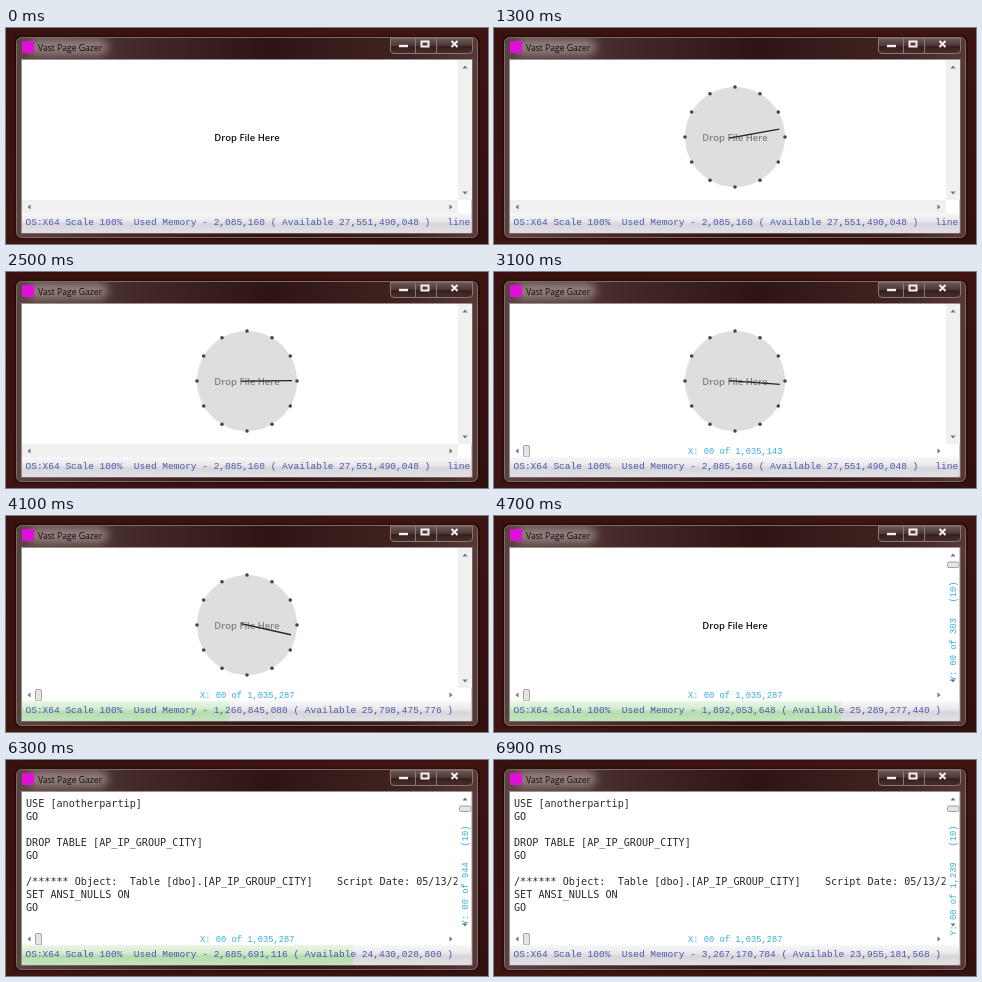
Animation, 482 px wide and 216 px high, one loop 8 s. Source, as an HTML page:

```html
<!DOCTYPE html>
<html lang="en">
<head>
<meta charset="utf-8">
<title>Vast Page Gazer</title>
<style>
  html, body { margin: 0; width: 100%; height: 100%; overflow: hidden; background: #35120f; }
  svg { display: block; width: 100vw; height: 100vh; }
  text { white-space: pre; }
  .ui { font-family: "Open Sans", "Noto Sans", sans-serif; }
  .status { font: 9.5px "Liberation Mono", monospace; fill: #4c55a8; }
  .axis { font: 8.75px "Liberation Mono", monospace; fill: #35aede; }
  .code { font: 10.15px "DejaVu Sans Mono", monospace; fill: #2a2a2a; }
</style>
</head>
<body>
<svg viewBox="0 0 482 216" preserveAspectRatio="none">
  <defs>
    <linearGradient id="desk" x2="1" y2="1">
      <stop offset="0" stop-color="#37120f"/>
      <stop offset=".5" stop-color="#3f1512"/>
      <stop offset="1" stop-color="#32110e"/>
    </linearGradient>
    <linearGradient id="glass">
      <stop offset="0" stop-color="#5a4442"/>
      <stop offset=".3" stop-color="#402625"/>
      <stop offset=".55" stop-color="#2e1514"/>
      <stop offset=".85" stop-color="#402422"/>
      <stop offset="1" stop-color="#573a37"/>
    </linearGradient>
    <linearGradient id="bar" x2="0" y2="1">
      <stop offset="0" stop-color="#f8f8f9"/>
      <stop offset=".4" stop-color="#e9e9ed"/>
      <stop offset=".55" stop-color="#d6d6db"/>
      <stop offset="1" stop-color="#e2e2e6"/>
    </linearGradient>
    <linearGradient id="green" x2="0" y2="1">
      <stop offset="0" stop-color="#e9f7e6"/>
      <stop offset=".4" stop-color="#d2ecce"/>
      <stop offset=".55" stop-color="#b4dcae"/>
      <stop offset="1" stop-color="#c4e5be"/>
    </linearGradient>
    <linearGradient id="button" x2="0" y2="1">
      <stop offset="0" stop-color="#705a58"/>
      <stop offset=".5" stop-color="#4d3634"/>
      <stop offset=".5" stop-color="#341d1c"/>
      <stop offset="1" stop-color="#482f2d"/>
    </linearGradient>
    <filter id="soft" x="-30%" y="-80%" width="160%" height="260%"><feGaussianBlur stdDeviation="5"/></filter>
    <clipPath id="view"><rect x="16" y="32" width="435.5" height="140"/></clipPath>
    <clipPath id="foot"><rect x="16" y="185" width="449" height="20"/></clipPath>
    <clipPath id="head"><rect x="11" y="10" width="460" height="21"/></clipPath>
  </defs>

  <rect width="482" height="216" fill="url(#desk)"/>
  <rect x="8" y="7.5" width="466" height="204" rx="6" fill="#1d0908" opacity=".5"/>
  <rect x="10.5" y="9.5" width="461" height="200" rx="5" fill="url(#glass)" stroke="#7d6967"/>
  <g clip-path="url(#head)">
    <rect x="22" y="11" width="80" height="16" rx="8" fill="#93817f" filter="url(#soft)"/>
  </g>
  <rect x="16" y="13" width="12" height="12" fill="#e010d8"/>
  <text class="ui" x="32" y="22.5" font-size="8.6" fill="#120808">Vast Page Gazer</text>

  <path d="M384.5 10V22Q384.5 25.5 388 25.5H463Q466.5 25.5 466.5 22V10Z" fill="url(#button)" stroke="#8b7775"/>
  <path d="M409.5 10V25M430.5 10V25" stroke="#8b7775"/>
  <g fill="none" stroke="#f4f0f0">
    <path d="M393 18H402" stroke-width="2.4"/>
    <rect x="415.5" y="13.5" width="7" height="5" stroke-width="2"/>
    <path d="M445.5 13L451.5 19M451.5 13L445.5 19" stroke-width="2"/>
  </g>

  <rect x="15.5" y="31.5" width="450.5" height="173.5" fill="#fff" stroke="#a0908f"/>
  <rect id="trackX" x="16" y="172" width="436" height="13" fill="#f0f0f0"/>
  <rect id="trackY" x="452" y="32" width="14" height="140" fill="#f0f0f0"/>
  <g fill="#70747a">
    <path d="M456.5 40.5L459 37.5L461.5 40.5Z"/>
    <path d="M456.5 163.5L459 166.5L461.5 163.5Z"/>
    <path d="M24.5 176.5L21.5 179L24.5 181.5Z"/>
    <path d="M443.5 176.5L446.5 179L443.5 181.5Z"/>
  </g>
  <g id="axisX">
    <rect x="29.5" y="173.5" width="6" height="11.5" rx="1.5" fill="#e4e4e6" stroke="#a0a2a6"/>
    <text id="labelX" class="axis" x="194" y="182"></text>
  </g>
  <g id="axisY">
    <rect x="453.5" y="46" width="11.5" height="5.5" rx="1.5" fill="#e4e4e6" stroke="#a0a2a6"/>
    <text id="labelY" class="axis" transform="translate(462 65.5) rotate(-90)" text-anchor="end"></text>
  </g>

  <text id="drop" class="ui" x="241" y="113" text-anchor="middle" font-size="9.5" font-weight="600" fill="#111">Drop File Here</text>
  <g id="code" class="code" clip-path="url(#view)"></g>
  <g id="clock" transform="translate(241 109)">
    <circle r="50" fill="#cac8ca" fill-opacity=".6"/>
    <g id="dots" fill="#454345"></g>
    <path id="hand" d="M-6 0H45" stroke="#222" stroke-width="1.3"/>
  </g>

  <g clip-path="url(#foot)">
    <rect x="16" y="185" width="450" height="20" fill="url(#bar)"/>
    <rect id="progress" x="16" y="185" height="20" fill="url(#green)"/>
    <text id="status" class="status" x="19.5" y="197"></text>
  </g>
</svg>
<script>
  const LOOP = 8000, STEP = 100;
  const NS = "http://www.w3.org/2000/svg";
  const $ = id => document.getElementById(id);
  const commas = n => Math.round(n).toLocaleString("en-US");
  const show = (id, on) => { $(id).style.display = on ? "" : "none"; };

  function add(parent, tag, attrs, text = "") {
    const el = document.createElementNS(NS, tag);
    for (const key in attrs) el.setAttribute(key, attrs[key]);
    el.textContent = text;
    $(parent).appendChild(el);
  }

  // Linear interpolation through [time, value] points
  function track(points, t) {
    let [t0, v0] = points[0];
    for (const [t1, v1] of points) {
      if (t < t1) return t <= t0 ? v0 : v0 + (v1 - v0) * (t - t0) / (t1 - t0);
      [t0, v0] = [t1, v1];
    }
    return v0;
  }

  const USED = [[3100, 2085160], [4100, 1266845080], [4700, 1892053648], [5700, 2104211448], [6900, 3267170784]];
  const FREE = [[3100, 27551490048], [4100, 25798475776], [4700, 25289277440], [5700, 24904876032], [6900, 23955181568]];
  const ROWS = [[4500, 212], [4700, 303], [5700, 649], [6900, 1239]];
  const PROGRESS = [[3100, 0], [4700, 331]];

  const SCRIPT = [
    "USE [anotherpartip]", "GO", "",
    "DROP TABLE [AP_IP_GROUP_CITY]", "GO", "",
    "/****** Object:  Table [dbo].[AP_IP_GROUP_CITY]    Script Date: 05/13/2013",
    "SET ANSI_NULLS ON", "GO"
  ];
  SCRIPT.forEach((line, i) => add("code", "text", { x: 20, y: 47 + 13 * i }, line));

  for (let i = 0; i < 12; i++) {
    const a = i * Math.PI / 6;
    add("dots", "circle", { cx: 50 * Math.cos(a), cy: 50 * Math.sin(a), r: 1.8 });
  }

  function draw(time) {
    const t = Math.floor(time / STEP) * STEP;
    const opened = t >= 5000, wide = t >= 3000, tall = t >= 4500;

    show("drop", !opened);
    show("code", opened);

    show("clock", t >= 600 && !tall);
    $("clock").setAttribute("opacity", t < 700 ? 0.5 : 1);
    const angle = -4.5 + 8.1 * (Math.max(t, 1300) - 2000) / 1000;
    $("hand").setAttribute("transform", `rotate(${angle})`);

    show("trackX", !wide);
    show("axisX", wide);
    $("labelX").textContent = "X: 00 of " + (t < 3500 ? "1,035,143" : "1,035,287");

    show("trackY", !tall);
    show("axisY", tall);
    $("labelY").textContent = `Y: 00 of ${commas(track(ROWS, t))}   (10)`;

    show("progress", t < 6800);
    $("progress").setAttribute("width", track(PROGRESS, t));
    $("status").textContent =
      `OS:X64 Scale 100%  Used Memory - ${commas(track(USED, t))} ( Available ${commas(track(FREE, t))} )   line`;
  }

  const start = performance.now();
  function tick() {
    draw((performance.now() - start) % LOOP);
    requestAnimationFrame(tick);
  }
  tick();
</script>
</body>
</html>
```
